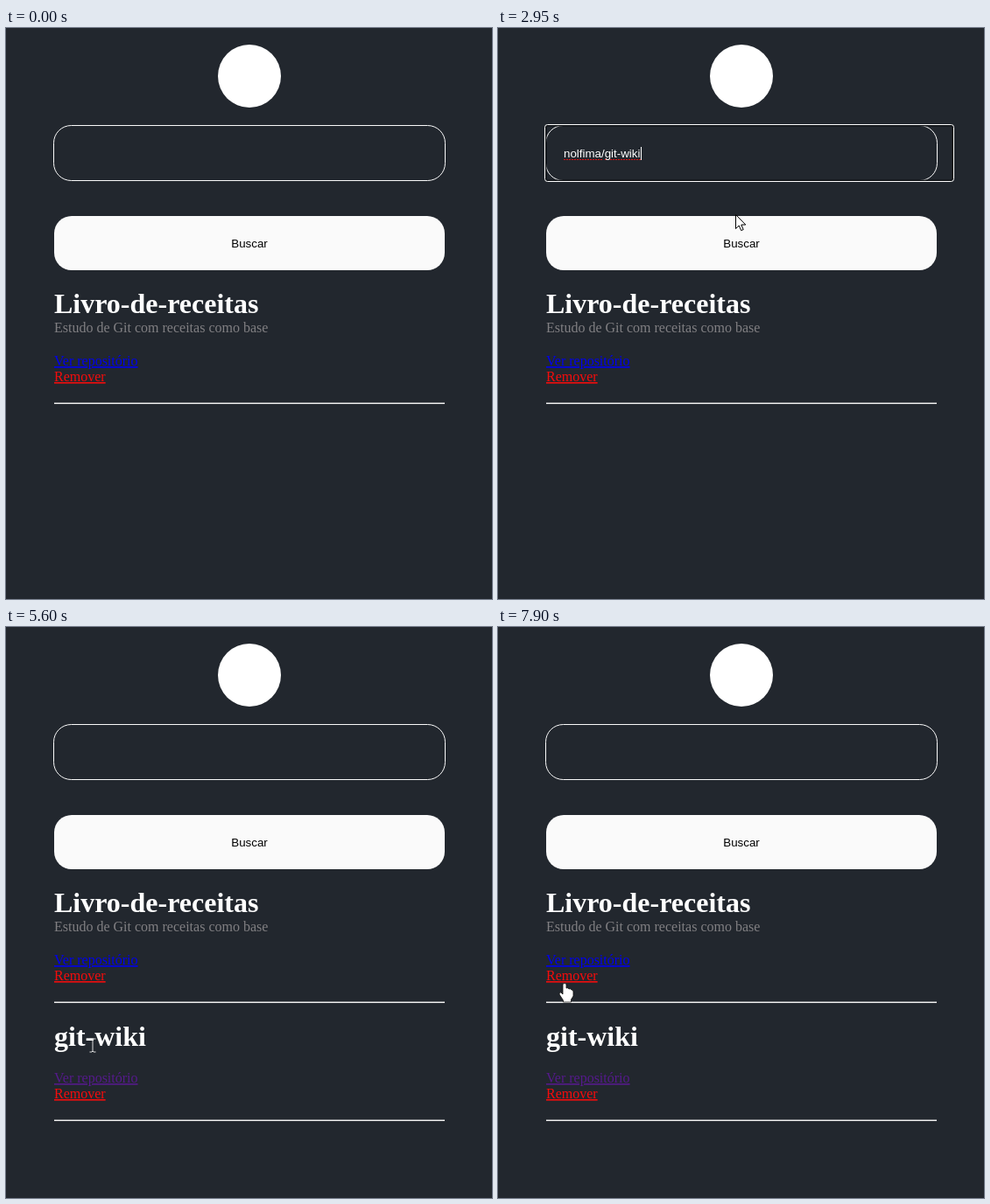
Write an HTML page that moves like this. It is 555x653 px and loops after 8 s.

```html
<!DOCTYPE html>
<html lang="pt">
<head>
<meta charset="utf-8">
<style>
html, body { margin: 0; width: 100%; height: 100%; overflow: hidden; background: #22272e; }
svg { display: block; }
text { font: 16px "Liberation Serif", "Times New Roman", serif; white-space: pre; }
.ui { font: 13.333px "Liberation Sans", Arial, sans-serif; }
.title { font-size: 32px; font-weight: bold; fill: #fff; }
.note { fill: #807f82; }
.link { text-decoration: underline; fill: #0000ee; }
.seen { fill: #551a8b; }
.remove { fill: #f50c0c; }
.rule { fill: #eee; }
</style>
</head>
<body>
<svg width="555" height="653" viewBox="0 0 555 653">
  <circle cx="278" cy="55" r="36" fill="#fff"/>

  <rect x="54.5" y="111.5" width="447" height="63" rx="20" fill="none" stroke="#fafafa"/>
  <g id="focus" fill="none">
    <rect x="54.75" y="111.75" width="464.5" height="62.5" rx="2" stroke="#101316" stroke-width="1.5"/>
    <rect x="53.5" y="110.5" width="467" height="65" rx="3" stroke="#fff"/>
  </g>
  <path id="squiggle" d="M75 150.5H119M122 150.5H163" stroke="#e01010" stroke-dasharray="2 1"/>
  <text id="query" class="ui" x="75" y="148" fill="#fff">nolfima/git-wiki</text>
  <rect id="caret" y="136" width="1" height="15" fill="#fff"/>

  <g id="button">
    <rect x="55" y="215" width="446" height="62" rx="20" fill="#fafafa"/>
    <text class="ui" x="278" y="251" text-anchor="middle">Buscar</text>
  </g>

  <text class="title" x="55" y="326">Livro-de-receitas</text>
  <text class="note" x="55" y="348">Estudo de Git com receitas como base</text>
  <text class="link" x="55" y="386">Ver repositório</text>
  <text class="link remove" x="55" y="404">Remover</text>
  <rect class="rule" x="55" y="428.5" width="446" height="1.5"/>

  <g id="result">
    <text class="title" x="55" y="479">git-wiki</text>
    <text class="link seen" x="55" y="521">Ver repositório</text>
    <text class="link remove" x="55" y="539">Remover</text>
    <rect class="rule" x="55" y="563.5" width="446" height="1.5"/>
  </g>

  <g id="cursor">
    <circle id="press" cx="-1" cy="-1" r="12.5" fill="#dcd405" fill-opacity=".62"/>
    <path id="arrow" d="M.5 .5V16.5L4.2 13L6.7 18.6L9.2 17.5L6.8 12H11.8Z" fill="#fff" stroke="#000"/>
    <path id="hand" d="M-2 1.5Q0 -1 2 1.5V6Q4 5 5 7Q7 6 8 8Q10 8 10 10V15L7.5 19V22H-1.5V20L-6 13Q-6 10 -4 11L-2 13Z" fill="#fff" stroke="#111" stroke-width=".8"/>
    <path id="beam" d="M-3.5 -7H-1L0 -6L1 -7H3.5M0 -6V7M-3.5 8H-1L0 7L1 8H3.5" fill="none" stroke="#ddd"/>
  </g>
</svg>
<script>
const LOOP = 8000;
const el = id => document.getElementById(id);
const show = (id, on) => el(id).style.display = on ? '' : 'none';

// time, x, y, and 1 where the pointer slows to a stop
const path = [
  [910, 545, 361], [1120, 281, 208], [1350, 274, 164, 1],
  [2780, 274, 164], [2950, 271, 213], [3260, 279, 236, 1],
  [4940, 279, 236], [5600, 99, 478], [5720, 95, 502, 1],
  [5930, 93, 511, 1], [6330, 98, 383, 1], [6530, 95, 419],
  [7120, 91, 508, 1], [7280, 91, 508], [7900, 76, 407, 1]
];

function pointer(t) {
  const i = path.findIndex(p => p[0] > t);
  if (i < 0) return path.at(-1).slice(1, 3);
  if (i === 0) return path[0].slice(1, 3);
  const [t0, x0, y0] = path[i - 1], [t1, x1, y1, stop] = path[i];
  let k = (t - t0) / (t1 - t0);
  if (stop) k = 1 - (1 - k) ** 2;
  return [x0 + (x1 - x0) * k, y0 + (y1 - y0) * k];
}

const within = ([x, y], l, t, r, b) => x >= l && x <= r && y >= t && y <= b;
const overButton = p => within(p, 55, 215, 501, 277);

function shape(p, listed) {
  const links = top => within(p, 55, top, 151, top + 17) || within(p, 55, top + 18, 114, top + 35);
  if (overButton(p) || links(372) || listed && links(507)) return 'hand';
  const onText = within(p, 54, 111, 502, 175) || within(p, 55, 299, 288, 335) ||
    within(p, 55, 336, 299, 352) || listed && within(p, 55, 452, 160, 488);
  return onText ? 'beam' : 'arrow';
}

function draw(t) {
  const focused = t >= 1980 && t < 3900;
  const typed = t >= 2550;
  const listed = t >= 4360;
  const pos = pointer(t);
  const kind = shape(pos, listed);

  show('focus', focused);
  show('query', typed && !listed);
  show('squiggle', typed && focused);
  show('caret', focused && !(t >= 2520 && !typed) && !(t >= 3080 && t < 3590));
  el('caret').setAttribute('x', typed ? 163 : 75);
  show('result', listed);

  // the button reacts slightly after the pointer
  el('button').setAttribute('opacity', t > 940 && overButton(pointer(t - 30)) ? .25 : 1);

  show('cursor', t >= 910);
  el('cursor').setAttribute('transform', `translate(${pos.map(Math.round)})`);
  for (const name of ['arrow', 'hand', 'beam']) show(name, name === kind);
  show('press', t >= 1980 && t < 2080 || t >= 3900 && t < 4030);
}

const start = performance.now();
function tick() {
  draw((performance.now() - start) % LOOP);
  requestAnimationFrame(tick);
}
tick();
</script>
</body>
</html>
```
